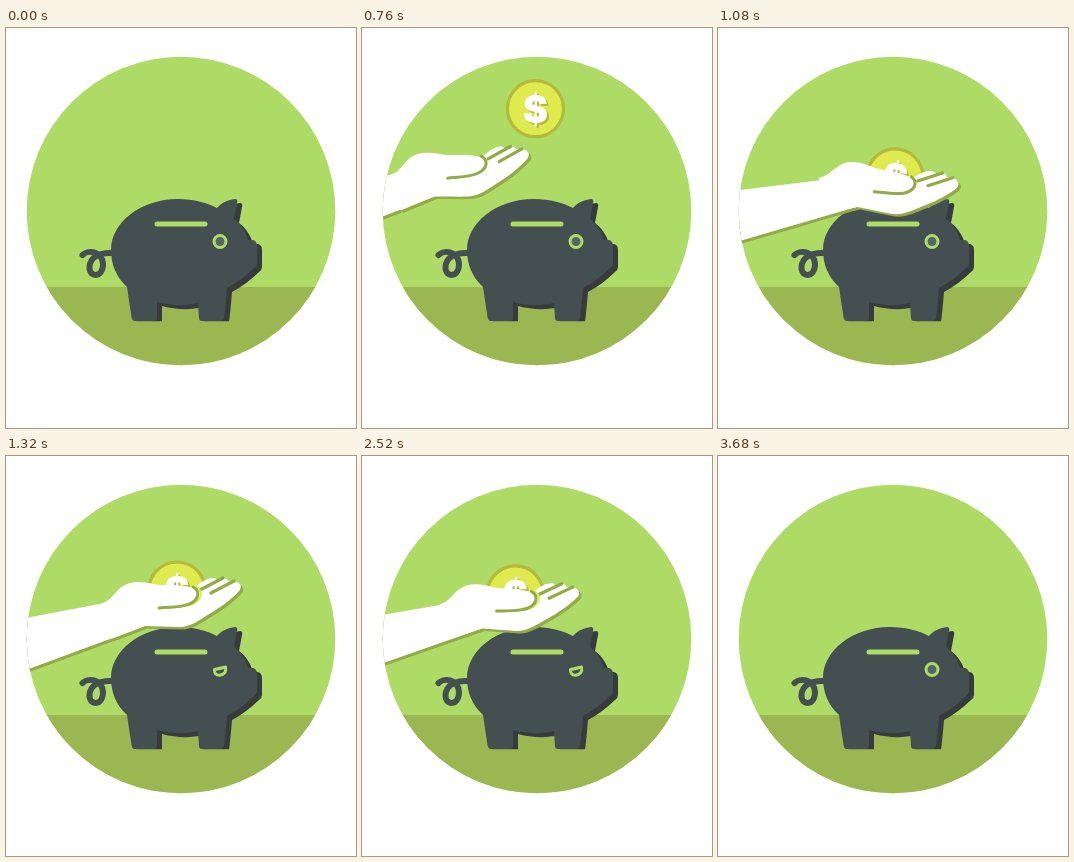
Animation of 350x400 px, one loop 4 s. Source, as an HTML page with a canvas:

```html
<!DOCTYPE html>
<html lang="en">
<head>
<meta charset="utf-8">
<title>Piggy bank</title>
<style>
html, body { margin: 0; width: 100%; height: 100%; overflow: hidden; background: #fff; }
canvas { display: block; width: 350px; height: 400px; }
</style>
</head>
<body>
<canvas id="stage" width="350" height="400"></canvas>
<script>
const ctx = document.getElementById('stage').getContext('2d');
const LOOP = 4000;
const GREEN = '#addb65', GROUND = '#9ab752', PIG = '#434f50', PIG_SHADE = '#363c3e', PUPIL = '#55656a';
const OLIVE = '#92ab48', YELLOW = '#deea4e', RIM = '#b5b93c';

const mix = (a, b, k) => a + (b - a) * k;
const span = (t, a, b) => Math.max(0, Math.min(1, (t - a) / (b - a)));
const sineOut = u => Math.sin(u * Math.PI / 2);
const sineInOut = u => (1 - Math.cos(u * Math.PI)) / 2;
const quadInOut = u => u < 0.5 ? 2 * u * u : 1 - 2 * (1 - u) * (1 - u);
const blend = (a, b, k) => ({ x: mix(a.x, b.x, k), y: mix(a.y, b.y, k), turn: mix(a.turn, b.turn, k) });

// Wrist position and angle of the hand.
const REACH = { x: 55, y: 149, turn: -0.03 };
const DIP = { x: 129, y: 157, turn: 0.17 };
const HOLD = { x: 125, y: 150, turn: 0 };
const SEAT = { x: 46, y: -16 }; // coin relative to the wrist

function disc(x, y, r) {
  const path = new Path2D();
  path.arc(x, y, r, 0, Math.PI * 2);
  return path;
}

function fill(path, color) {
  ctx.fillStyle = color;
  ctx.fill(path);
}

function stroke(path, color, width) {
  ctx.strokeStyle = color;
  ctx.lineWidth = width;
  ctx.stroke(path);
}

function placed(x, y, turn, paint) {
  ctx.save();
  ctx.translate(x, y);
  ctx.rotate(turn);
  paint();
  ctx.restore();
}

const scene = disc(175, 183, 154.3);
const body = new Path2D(`M105 222 C105 195 134 171 172 171 C188 171 202 175 211 180
  C216 174 222 172 229 171 Q232 171 231 175 L228 191 C235 196 240 204 242 212
  L247 212 Q251 213 251 218 L251 235 Q251 238 248 240 C240 248 230 255 221 260
  C220 272 219 282 218 290 Q217 293 213 293 L196 293 Q193 293 193 290 L192 275
  C180 278 166 278 151 274 L151 290 Q151 293 148 293 L129 293 Q126 293 125.5 289
  L121 259 C110 249 105 236 105 222 Z`);
const tail = new Path2D('M76.5 227 C81 222 96 222 97 236 C97 250 83 250 83.5 239 C84 230 92 224 107 225');
const slot = new Path2D('M151 196 H199');
const squint = new Path2D('M208.5 213.5 Q214 212.5 219.5 211 Q221 218 213.5 219.3 Q208 219 208.5 213.5 Z');
const aboveFeet = new Path2D('M0 0 H350 V293.3 H0 Z');

// Hand parts, with the wrist at the origin.
const arm = new Path2D('M-330 55 L-29 -2.5 L0 -15 L14 20 L-330 147 Z');
const palm = new Path2D(`M-29 -2.5 C-20 -5 -15 -16 -8 -20 C0 -25 10 -25 25 -21.5
  C36 -20 48 -22 58 -19 Q64 -18 67 -21 Q75 -28 82 -28 Q85 -28 86 -26 L92 -28
  Q96 -28 97 -25 L104 -25 Q112 -22 109 -16 C104 -10 92 0 80 7 C68 14 60 21 48 21
  C36 21 24 20 14 20 L-20 33 Z`);
const thumb = new Path2D('M28 2 C42 1 55 1 62 -4 C69 -9 68 -16 62 -19');
const slit = new Path2D('M69 -16 L92 -28');

function drawPig(happy) {
  stroke(tail, PIG, 6);
  ctx.save();
  ctx.clip(aboveFeet);
  placed(5, 4, 0, () => fill(body, PIG_SHADE));
  ctx.restore();
  fill(body, PIG);
  stroke(slot, GREEN, 5);
  if (happy) {
    stroke(squint, GREEN, 3);
  } else {
    fill(disc(214, 213.5, 6), PUPIL);
    stroke(disc(214, 213.5, 6), GREEN, 3);
  }
}

function drawCoin() {
  fill(disc(0, 0, 29), YELLOW);
  stroke(disc(0, 0, 28), RIM, 3.2);
  ctx.font = '900 38px Inter, sans-serif';
  ctx.textAlign = 'center';
  const m = ctx.measureText('$');
  const base = (m.actualBoundingBoxAscent - m.actualBoundingBoxDescent) / 2;
  for (const [shift, color] of [[2, RIM], [0, '#fff']]) {
    ctx.fillStyle = color;
    ctx.fillText('$', shift, base + shift);
  }
}

// The forearm follows the hand's turn only in part.
function drawHand({ x, y, turn }, caught) {
  for (const [shift, color] of [[2.5, OLIVE], [0, '#fff']]) {
    placed(x + shift, y + shift, turn * 0.4, () => fill(arm, color));
    placed(x + shift, y + shift, turn, () => fill(palm, color));
  }
  placed(x, y, turn, () => {
    for (const i of [0, 1]) {
      placed(i * 11, i * 3, 0, () => stroke(slit, OLIVE, 3.2));
    }
    if (caught) placed(3, 0, 0, () => stroke(thumb, YELLOW, 2));
    stroke(thumb, OLIVE, 3);
  });
}

function handAt(t) {
  if (t < 1060) {
    const hand = blend(REACH, DIP, sineInOut(span(t, 760, 1040)));
    hand.x = mix(-100, DIP.x, sineOut(span(t, 500, 1040)));
    return hand;
  }
  const hand = blend(DIP, HOLD, sineInOut(span(t, 1080, 1320)));
  const sway = Math.sin(Math.PI * span(t, 2260, 2760));
  hand.x += 29 * sineInOut(span(t, 2190, 2370)) - 249 * quadInOut(span(t, 2370, 2860));
  hand.y += 2 * sway;
  hand.turn += 0.04 * sway;
  return hand;
}

function coinAt(t, { x, y, turn }) {
  const c = Math.cos(turn), s = Math.sin(turn);
  const seat = { x: x + SEAT.x * c - SEAT.y * s, y: y + SEAT.x * s + SEAT.y * c, turn };
  if (t >= 1040) return seat;
  const fall = sineOut(span(t, 580, 1040));
  return { x: mix(170, 176, fall), y: mix(-12, 148, fall), turn: Math.max(0, turn) };
}

function drawGift(t) {
  if (t < 500 || t >= 2850) return;
  const hand = handAt(t);
  const coin = coinAt(t, hand);
  placed(coin.x, coin.y, coin.turn, drawCoin);
  drawHand(hand, t >= 1200);
}

function draw(t) {
  const happy = t >= 1200 && t < 3680;
  ctx.clearRect(0, 0, 350, 400);
  ctx.lineCap = ctx.lineJoin = 'round';
  ctx.save();
  ctx.clip(scene);
  ctx.fillStyle = GREEN;
  ctx.fillRect(0, 0, 350, 400);
  ctx.fillStyle = GROUND;
  ctx.fillRect(0, 259, 350, 141);
  drawPig(happy);
  drawGift(t);
  ctx.restore();
}

const start = performance.now();
function tick() {
  draw((performance.now() - start) % LOOP);
  requestAnimationFrame(tick);
}
tick();
</script>
</body>
</html>
```
